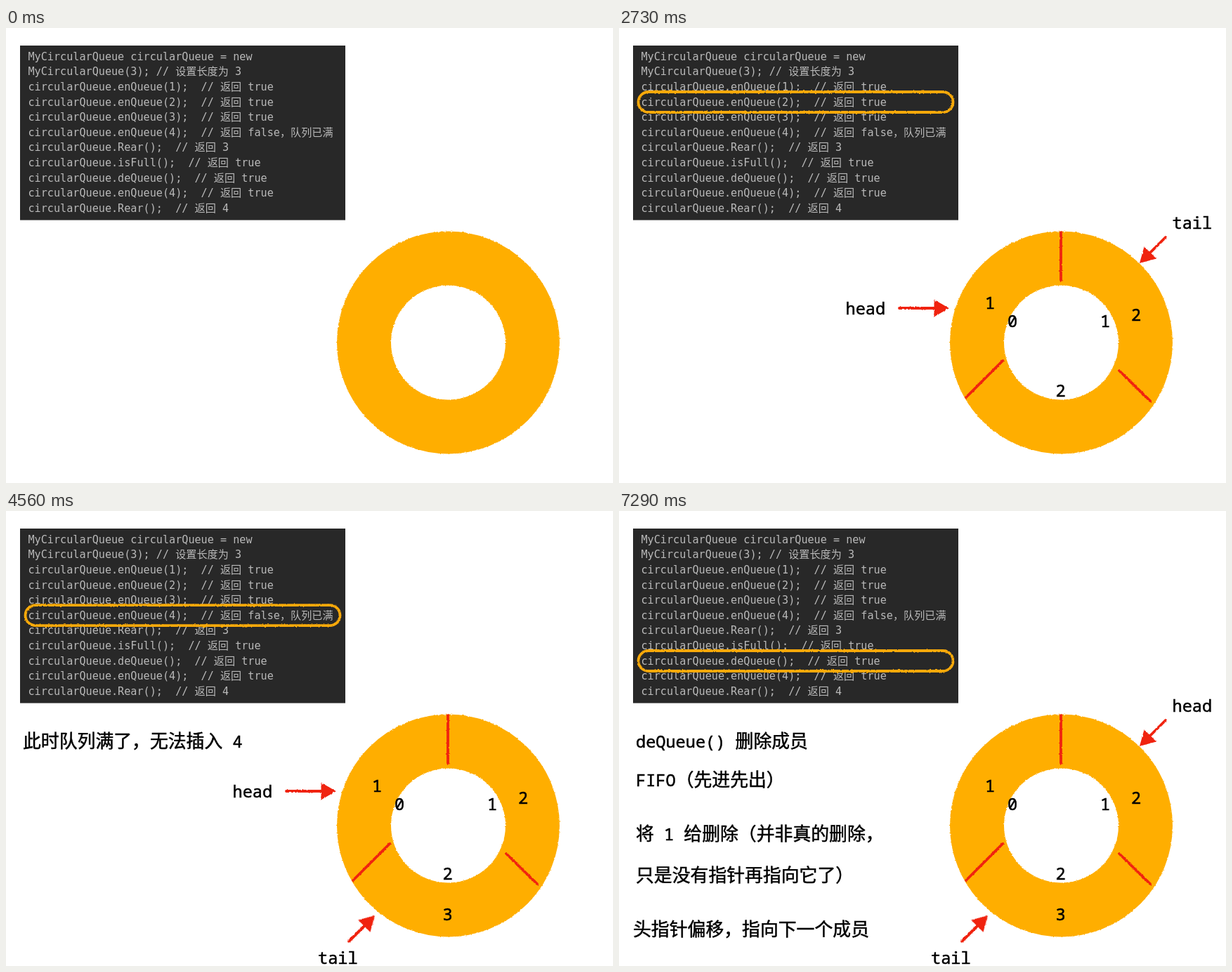
Animation, 864 px wide and 648 px high, one loop 8000 ms. Source, as an HTML page:

```html
<!DOCTYPE html>
<html lang="zh-CN">
<head>
<meta charset="utf-8">
<style>
html, body { margin: 0; width: 100%; height: 100%; overflow: hidden; background: #fff; }
svg { display: block; width: 864px; height: 648px; }
text { white-space: pre; }
.code { font: 15.15px "DejaVu Sans Mono", "Noto Sans CJK SC", "Noto Sans CJK", monospace; fill: #b9b9b9; }
.note { font: 25.85px "Noto Sans CJK SC", "Noto Sans CJK", sans-serif; }
.latin { font: 23.6px "Noto Sans Mono", monospace; }
.note, .latin { stroke: #000; stroke-width: .5; }
.digit { text-anchor: middle; }
.red { stroke: #f0230f; stroke-width: 3.8; fill: #f0230f; stroke-linecap: round; }
.pill { stroke: #f8a90a; stroke-width: 3.8; fill: none; }
</style>
</head>
<body>
<svg viewBox="0 0 864 648">
  <filter id="rough" filterUnits="userSpaceOnUse" x="0" y="0" width="864" height="648" color-interpolation-filters="sRGB">
    <feTurbulence type="fractalNoise" baseFrequency=".4" numOctaves="2" seed="4"/>
    <feDisplacementMap in="SourceGraphic" scale="2.6" xChannelSelector="R" yChannelSelector="G"/>
  </filter>
  <rect x="20" y="25" width="463" height="248.6" fill="#282828"/>
  <g id="code"></g>
  <circle cx="629.5" cy="448" r="120" fill="none" stroke="#ffae00" stroke-width="77" filter="url(#rough)"/>
  <g id="scene"></g>
</svg>
<script>
const LINE = 21.6;
const CODE = [
  'MyCircularQueue circularQueue = new',
  'MyCircularQueue(3); // 设置长度为 3',
  'circularQueue.enQueue(1);  // 返回 true',
  'circularQueue.enQueue(2);  // 返回 true',
  'circularQueue.enQueue(3);  // 返回 true',
  'circularQueue.enQueue(4);  // 返回 false，队列已满',
  'circularQueue.Rear();  // 返回 3',
  'circularQueue.isFull();  // 返回 true',
  'circularQueue.deQueue();  // 返回 true',
  'circularQueue.enQueue(4);  // 返回 true',
  'circularQueue.Rear();  // 返回 4'
];

// Pointer spots: label x, baseline y, then arrow start and tip
const SPOTS = {
  left: [322.5, 407.5, 399, 399, 470, 399],
  upperLeft: [356.5, 323.5, 420, 326, 490, 360],
  right: [787.5, 286, 778, 298, 741, 335],
  bottom: [444, 645, 488, 613, 525, 576]
};

const STEPS = [
  { at: 0 },
  { at: 930, line: 0, rows: 2, values: 0, head: 'left', tail: 'upperLeft' },
  { at: 1830, line: 2, values: 1, head: 'left', tail: 'upperLeft' },
  { at: 2730, line: 3, values: 2, head: 'left', tail: 'right' },
  { at: 3660, line: 4, values: 3, head: 'left', tail: 'bottom' },
  { at: 4560, line: 5, values: 3, head: 'left', tail: 'bottom',
    notes: [[24, 337, '此时队列满了，无法插入 4']] },
  { at: 5460, line: 6, shift: -8, values: 3, head: 'left', tail: 'bottom',
    notes: [[21.5, 317, 'Rear() 获取队列的最后一个成员'], [20.5, 371.5, '此时 tail 指针指向 3']] },
  { at: 6360, line: 7, values: 3, head: 'left', tail: 'bottom',
    notes: [[24, 337, '此时队列满了 isFull() 返回 true']] },
  { at: 7290, line: 8, values: 3, head: 'right', tail: 'bottom',
    notes: [[24, 337, 'deQueue() 删除成员'], [24, 392, 'FIFO（先进先出）'],
      [24, 469, '将 1 给删除（并非真的删除，'], [24, 528, '只是没有指针再指向它了）'],
      [20, 605, '头指针偏移，指向下一个成员']] }
];
const LOOP = 8000;

const text = (x, y, content, cls) => `<text x="${x}" y="${y}" class="${cls}">${content}</text>`;
const digit = ([x, y], n) => text(x, y, n, 'latin digit');
const note = ([x, y, s]) =>
  text(x, y, s.replace(/[ -~]+/g, '<tspan class="latin">$&</tspan>'), 'note');

function arrow([, , x1, y1, x2, y2]) {
  const length = Math.hypot(x2 - x1, y2 - y1);
  const angle = Math.atan2(y2 - y1, x2 - x1) * 180 / Math.PI;
  return `<g transform="translate(${x1} ${y1}) rotate(${angle})">
    <path d="M0 0H${length - 18}"/>
    <path d="M${length - 2} 0l-18.5-10.5v21z" stroke-width="2"/></g>`;
}

function pill({ line, rows = 1, shift = 0 }) {
  return `<rect class="pill" x="${27.5 + shift}" y="${26.2 + line * LINE}" width="448"
    height="${29 + (rows - 1) * LINE}" rx="14.5"/>`;
}

function draw(step) {
  if (step.line === undefined) return '';
  const pointers = ['head', 'tail'].map(name => [name, SPOTS[step[name]]]);
  const values = [[528, 399.5], [736, 416.5], [628.5, 582.5]].slice(0, step.values);
  const indexes = [[560, 425.5], [692, 425.5], [628.5, 525]];
  return `<g filter="url(#rough)">${pill(step)}<g class="red">
    <path d="M629 291V359M546 474L494 526M712 488L756 531"/>
    ${pointers.map(p => arrow(p[1])).join('')}</g></g>`
    + pointers.map(([name, [x, y]]) => text(x, y, name, 'latin')).join('')
    + indexes.map((p, i) => digit(p, i)).join('')
    + values.map((p, i) => digit(p, i + 1)).join('')
    + (step.notes || []).map(note).join('');
}

document.getElementById('code').innerHTML =
  CODE.map((s, i) => text(31.5, 45.8 + i * LINE, s, 'code')).join('');

const scene = document.getElementById('scene');
let current;
function tick() {
  const time = performance.now() % LOOP;
  const step = STEPS.findLast(s => s.at <= time);
  if (step !== current) scene.innerHTML = draw(current = step);
  requestAnimationFrame(tick);
}
tick();
</script>
</body>
</html>
```
